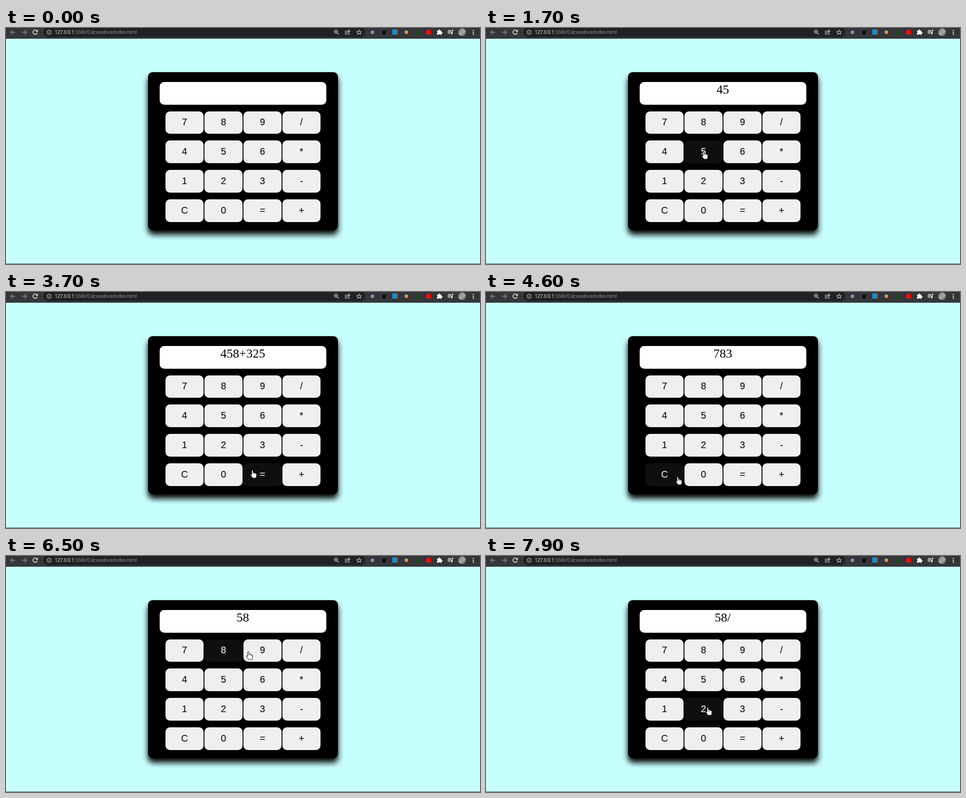
Write an HTML page that moves like this. It is 1058x529 px and loops after 8000 ms.

```html
<!DOCTYPE html>
<html lang="es">
<head>
<meta charset="utf-8">
<title>Calculadora</title>
<style>
  html, body { margin: 0; width: 100%; height: 100%; overflow: hidden; background: #c7ffff; }
  svg { display: block; width: 100vw; height: 100vh; }
  .url { font: 10.2px "Open Sans", sans-serif; fill: #9aa0a6; }
  .url .host { fill: #fff; }
  .panel { filter: drop-shadow(0 10px 6.67px #000); }
  .key rect { fill: #efefef; }
  .key text { font: 21.33px "Liberation Sans", Arial, sans-serif; text-anchor: middle; }
  .key.lit rect { fill: #100e0f; }
  .key.lit text { fill: #fff; }
  #display { font: 28px "Liberation Serif", "Times New Roman", serif; text-anchor: middle; }
  .line { fill: none; stroke: #d5d7da; stroke-width: 1.3; }
  .thin { stroke-width: 1.1; }
  .bold { stroke: #fff; stroke-width: 1.5; }
  .dim { stroke: #929498; }
  .cursor { fill: #fff; stroke: #000; stroke-linejoin: round; }
</style>
</head>
<body>
<svg viewBox="0 0 1058 529">
  <defs>
    <linearGradient id="photo" x1="0" y1="0" x2="1" y2="1">
      <stop offset="0" stop-color="#777"/><stop offset=".55" stop-color="#aaa"/><stop offset="1" stop-color="#555"/>
    </linearGradient>
  </defs>
  <rect width="1058" height="529" fill="#c7ffff"/>
  <rect y="528" width="1058" height="1" fill="#3b4545"/>

  <g id="toolbar">
    <rect width="1058" height="24" fill="#35363a"/>
    <rect x="83" y="-2" width="719" height="22" rx="11" fill="#202124"/>
    <path class="line dim" d="M21 9.5H10.5M15 4.5l-5 5 5 5M35 9.5h10.5M41 4.5l5 5-5 5"/>
    <path class="line bold" d="M69 6a5 5 0 1 0 1 5M70.2 4v4h-4"/>
    <circle class="line thin" cx="96.3" cy="9.5" r="4.8"/>
    <path class="line" d="M96.3 8.7v3.6M96.3 6.3v1.3"/>
    <text class="url" x="109" y="13"><tspan class="host">127.0.0.1</tspan>:5500/Calculadora/index.html</text>
    <circle class="line" cx="736.5" cy="8" r="3.5"/>
    <path class="line" d="M739 10.5l4 4M734.8 8h3.4"/>
    <path class="line thin" d="M760 6h-2.5v8h9v-2M760 11q.5-4.5 5-4.5V4.2l3 3.2-3 3V8.3q-3 0-5 2.7z"/>
    <path class="line thin" d="M788 4.5l1.5 3.4 3.7.3-2.800 2.500.8 3.600-3.200-1.900-3.200 1.900.8-3.600-2.800-2.500 3.700-.3z"/>
    <circle cx="818" cy="9.5" r="4" fill="#7899b5"/>
    <rect x="840" y="6" width="8" height="8" fill="#0b0b0c"/>
    <rect x="862" y="3" width="12" height="12" fill="#2f80b5"/>
    <rect x="890" y="6" width="7" height="7" fill="#e99a45"/>
    <rect x="914" y="5" width="9" height="9" fill="#24452a"/>
    <circle cx="943" cy="9.5" r="6" fill="#e3120f"/>
    <path fill="#fff" d="M962 6h3.5a1.8 1.8 0 1 1 3.4 0h3v3.3a1.800 1.800 0 1 1 0 3.400v2.300h-3.500a1.700 1.700 0 0 0-3.200 0H962v-3.200a1.700 1.700 0 0 0 0-3.200z"/>
    <path class="line bold" d="M986 5.5h8M986 8.5h8M986 11.5h5M996 12V5h3"/>
    <circle cx="994.5" cy="12" r="2" fill="#fff"/>
    <circle cx="1018" cy="9.5" r="8.5" fill="url(#photo)"/>
    <path d="M1043 5.500v8.500" stroke="#fff" stroke-width="2.600" stroke-linecap="round" stroke-dasharray="0 4.200"/>
  </g>

  <rect class="panel" x="317" y="99" width="424" height="354" rx="10"/>
  <rect x="343" y="121" width="372" height="51" rx="10" fill="#fff"/>
  <text id="display" x="528.5" y="147"></text>
  <g id="keys"></g>

  <g id="pointer">
    <path id="arrow" class="cursor" d="M0 0V13L3 10.3 5 15 7.2 14 5.2 9.6H9.3z"/>
    <g id="hand" class="cursor">
      <path d="M-1.6 1.4Q0-1 1.5 1.4V6Q3.5 4.8 4.3 6.6 6.3 5.6 6.9 7.4 9 6.6 9.2 9V13Q8.8 15.5 7.8 18H.2Q-1 15-4.6 10.8-4.6 8.4-1.6 11z"/>
      <path stroke-width=".7" d="M1.5 6v3.5M4.3 6.6v3M6.9 7.4v2.5"/>
    </g>
  </g>
</svg>
<script>
  const LOOP = 8000, STEP = 100, HOVER_LAG = 30;
  const $ = id => document.getElementById(id);

  const keys = [..."789/456*123-C0=+"].map((label, i) => {
    const row = Math.floor(i / 4);
    const edge = 186.6 + row * 65.8;
    const x = 356 + (i % 4) * 87, y = Math.round(edge);
    const w = 85, h = Math.round(edge + 50.7) - y;
    $("keys").insertAdjacentHTML("beforeend",
      `<g class="key"><rect x="${x}" y="${y}" width="${w}" height="${h}" rx="10"/>
       <text x="${x + w / 2}" y="${218 + row * 66}">${label}</text></g>`);
    return { label, x, y, w, h, node: $("keys").lastElementChild };
  });

  // A visit ends in a tap unless it only passes over the key.
  // dx, dy: where the pointer tip rests, from the middle of the key.
  const visit = (label, arrive, leave, dx = 0, dy = 0, tap = true) => {
    const k = keys.find(k => k.label === label);
    return { label, arrive, leave, tap, x: k.x + k.w / 2 + dx, y: k.y + k.h / 2 + dy };
  };
  const pass = (label, arrive, leave, dx, dy) => visit(label, arrive, leave, dx, dy, false);

  const visits = [
    { x: 11, y: -13, arrive: 0, leave: 300 },
    visit("4", 1000, 1200),
    visit("5", 1400, 1700, 0, -2),
    visit("8", 2000, 2100),
    visit("+", 2500, 2560, -8, 7),
    visit("3", 2775, 3100, -12, 7),
    visit("2", 3200, 3400),
    visit("5", 3500, 3600),
    visit("=", 3660, 4000, -23, -11),
    pass("=", 4000, 4100, -23, -11),
    pass("0", 4300, 4400, 0, 14),
    visit("C", 4700, 5200),
    pass("2", 5600, 5600, 0, -5),
    visit("5", 5800, 6000),
    visit("8", 6300, 6400, 2, 2),
    visit("/", 6700, 6800, -12, 3),
    pass("9", 6850, 7000, 25, 20),
    pass("2", 7900, LOOP, 9, -5)
  ];

  function pointerAt(t) {
    const i = visits.findIndex(v => t <= v.leave);
    const to = visits[i], from = visits[i - 1];
    if (t >= to.arrive) return [to.x, to.y];
    const k = (t - from.leave) / (to.arrive - from.leave);
    return [from.x + (to.x - from.x) * k, from.y + (to.y - from.y) * k];
  }

  const sum = text => String(text.split("+").reduce((total, n) => total + Number(n), 0));

  const readoutAt = t => visits
    .filter(v => v.tap && v.leave <= t)
    .reduce((text, { label }) =>
      label === "C" ? "" : label === "=" ? sum(text) : text + label, "");

  const keyUnder = ([x, y]) =>
    keys.find(k => x >= k.x && x <= k.x + k.w && y >= k.y && y <= k.y + k.h);

  function draw(t) {
    const pos = pointerAt(t);
    const hovered = keyUnder(pointerAt(Math.max(0, t - HOVER_LAG)));
    const overKey = Boolean(keyUnder(pos));
    for (const k of keys) k.node.classList.toggle("lit", k === hovered);
    $("pointer").setAttribute("transform", `translate(${pos.map(Math.round)})`);
    $("hand").style.display = overKey ? "" : "none";
    $("arrow").style.display = overKey ? "none" : "";
    $("display").textContent = readoutAt(t);
  }

  const start = performance.now();
  function tick() {
    const t = (performance.now() - start) % LOOP;
    draw(Math.floor(t / STEP) * STEP);
    requestAnimationFrame(tick);
  }
  tick();
</script>
</body>
</html>
```
